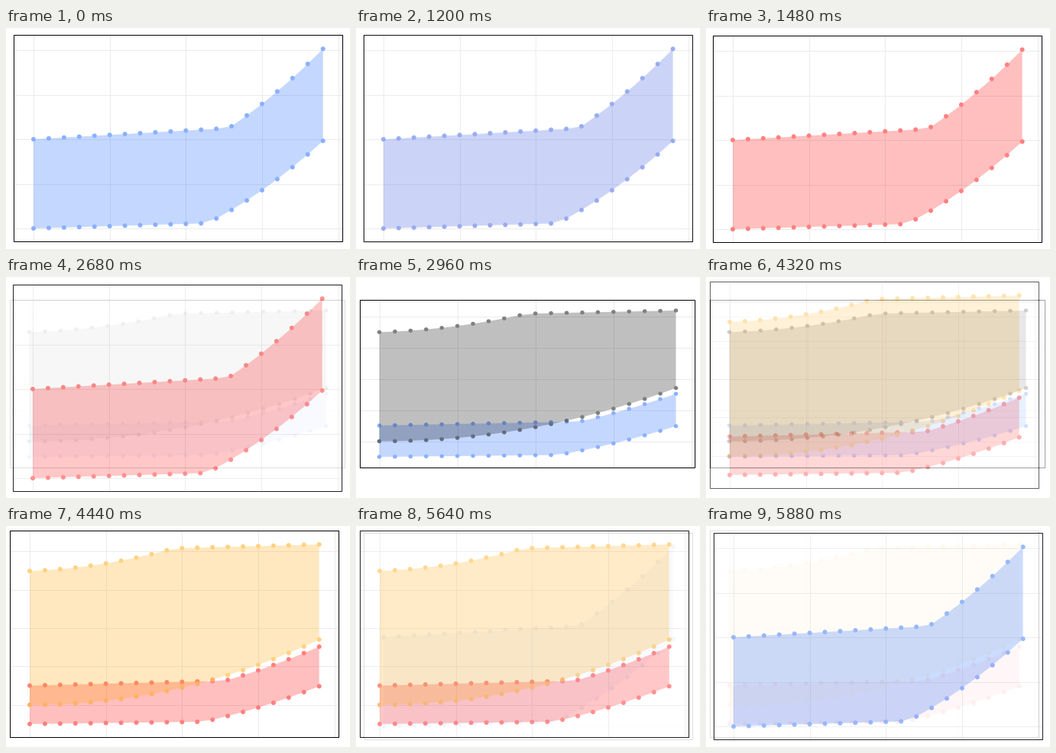
These frames come from a looping animation (450 px wide and 290 px high, 5920 ms). A matplotlib script:

```python
import numpy as np
import matplotlib.pyplot as plt
from matplotlib.animation import FuncAnimation
from matplotlib.colors import to_rgb
from matplotlib.patches import Ellipse, Polygon, Rectangle

W, H, DPI = 450, 290, 100
PX = 72 / DPI
TICK = 40            # ms per frame
HOLD, STEPS = 30, 8  # frames at rest, crossfade steps
SPAN = HOLD + STEPS - 1

BLUE, RED, BLACK, ORANGE = "#1460ff", "#ff0000", "#000000", "#ffa500"
GRID = "#ebebeb"
N = np.arange(20)


def rise(knee, start, slope, curve):
    t = N - knee
    return start + slope * t + curve * t ** 2


# Bands as (upper, lower) heights above the baseline, in data units:
# STEEP creeps along a line, then takes off; BROAD accelerates up to a cap.
STEEP = (np.maximum(117 + 1.14 * N, rise(13, 134.1, 13.5, 0.57)) / 116.8,
         np.maximum(0.6 * N, rise(12, 13, 10.75, 0.545)) / 116.8)
BROAD = (np.minimum(rise(0, 200.8, 0.68, 0.26), 225.5 + 0.53 * N) / 50.3,
         (25.1 + 85.7 * (N / 19) ** 2.07) / 50.3)


def single(left, top, color):
    return dict(box=(left, top, 430, 271), origin=(left + 26, top + 254),
                dx=19.93, unit=116.8, grid=(0, 0.5), dot=(6, 6),
                bands=[(STEEP, color)])


def double(box, origin, dx, unit, dot, steep, broad):
    return dict(box=box, origin=origin, dx=dx, unit=unit, grid=(0.5, 1),
                dot=dot, bands=[(STEEP, steep), (BROAD, broad)])


SLIDES = [
    single(10, 9, BLUE),
    single(9, 10, RED),
    double((5, 30, 438, 220), (30.5, 236), 20.42, 41, (5.6, 5.2), BLUE, BLACK),
    double((5, 6, 430, 271), (31, 259.8), 19.93, 50.3, (6, 6), RED, ORANGE),
]


def mix(color, ground, alpha):
    return tuple(alpha * np.array(to_rgb(color))
                 + (1 - alpha) * np.array(to_rgb(ground)))


def draw_slide(ax, box, origin, dx, unit, grid, dot, bands):
    left, top, width, height = box
    x0, base = origin
    for k in range(5):
        gx = x0 + 5 * dx * k
        gy = base - unit * (grid[0] + grid[1] * k)
        ax.plot([gx, gx], [top, top + height], color=GRID, lw=PX)
        ax.plot([left, left + width], [gy, gy], color=GRID, lw=PX)

    xs = x0 + dx * N
    # Dots tint whatever lies beneath their own band
    ceiling, tint = np.full(N.size, -np.inf), "white"
    for layer, (band, color) in enumerate(bands):
        edges = [np.c_[xs, base - unit * heights] for heights in band]
        ax.add_patch(Polygon(np.r_[edges[0], edges[1][::-1]], fc=color,
                             alpha=0.25, lw=0, zorder=3 + 2 * layer))
        for heights, points in zip(band, edges):
            covered = heights - dot[1] / 2 / unit < ceiling
            for point, inside in zip(points, covered):
                face = mix(color, tint if inside else "white", 0.5)
                ax.add_patch(Ellipse(point, *dot, fc=face, lw=0,
                                     zorder=4 + 2 * layer))
        ceiling, tint = band[0], mix(color, "white", 0.25)

    ax.add_patch(Rectangle((left, top), width, height, fill=False,
                           ec="black", lw=PX, snap=True, zorder=9))


def render(slide):
    ax = fig.add_axes([0, 0, 1, 1])
    draw_slide(ax, **slide)
    ax.set(xlim=(0, W), ylim=(H, 0))
    ax.axis("off")
    fig.canvas.draw()
    picture = np.array(fig.canvas.buffer_rgba())[..., :3].astype(float)
    ax.remove()
    return picture


fig = plt.figure(figsize=(W / DPI, H / DPI), dpi=DPI, facecolor="white")
pictures = [render(slide) for slide in SLIDES]
screen = fig.figimage(pictures[0].astype(np.uint8))


def update(frame):
    index, step = divmod(frame, SPAN)
    fade = max(0, step - HOLD + 1) / STEPS
    current, following = pictures[index], pictures[(index + 1) % len(pictures)]
    blend = (1 - fade) * current + fade * following
    screen.set_data(np.round(blend).astype(np.uint8))
    return [screen]


anim = FuncAnimation(fig, update, frames=SPAN * len(SLIDES), interval=TICK,
                     repeat=True, repeat_delay=0)
plt.show()
```
